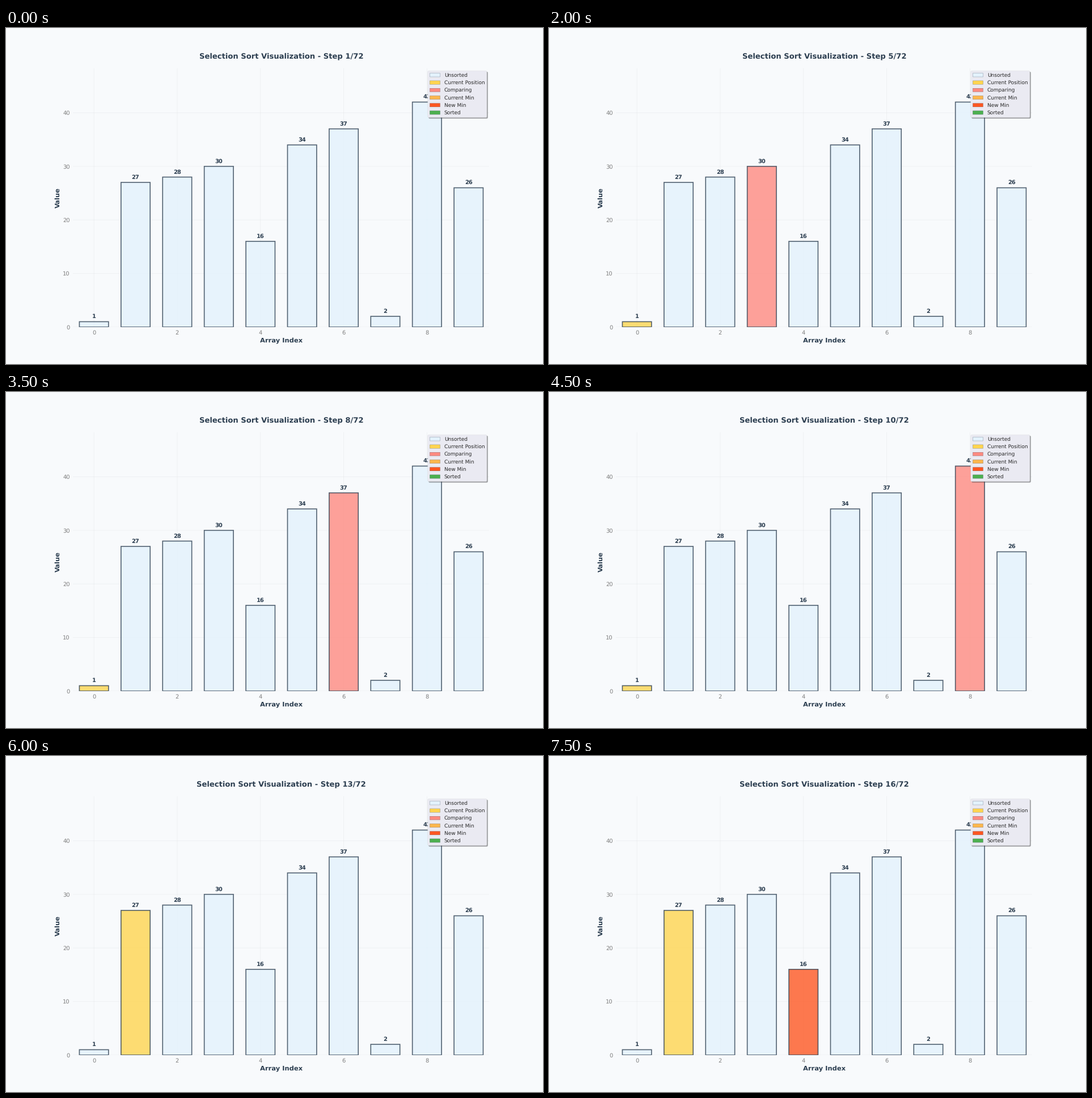
A matplotlib script that plays this animation: 947x592 px, repeating every 8 s.

```python
from itertools import islice

import matplotlib.pyplot as plt
from matplotlib.animation import FuncAnimation
from matplotlib.patches import Patch

VALUES = [1, 27, 28, 30, 16, 34, 37, 2, 42, 26]
TOTAL_STEPS = 72
SHOWN_STEPS = 16
STEP_MS = 500

BACKGROUND = "#F8FAFC"
INK = "#2C3E50"
COLORS = {
    "Unsorted": "#E3F2FD",
    "Current Position": "#FFD54F",
    "Comparing": "#FF8A80",
    "Current Min": "#FFB74D",
    "New Min": "#FF5722",
    "Sorted": "#4CAF50",
}

plt.rcParams.update({
    "font.family": "DejaVu Sans",
    "text.color": "0.15",
    "text.hinting": "none",
    "path.snap": False,
    "patch.linewidth": 0.3,
    "axes.axisbelow": True,
})


def selection_sort(values):
    """Yield the highlighted bars of each step as {index: role}."""
    a = list(values)
    yield {}
    for i in range(len(a) - 1):
        yield {i: "Current Position"}
        low = i
        for j in range(i + 1, len(a)):
            role = "Comparing"
            if a[j] < a[low]:
                low, role = j, "New Min"
            yield {i: "Current Position", j: role}
        a[i], a[low] = a[low], a[i]
        yield {i: "Sorted"}


steps = list(islice(selection_sort(VALUES), SHOWN_STEPS))

fig, ax = plt.subplots(figsize=(16, 10), dpi=59.2, facecolor=BACKGROUND)
ax.set_facecolor(BACKGROUND)
ax.spines[:].set_visible(False)
ax.set_xlim(-0.5, len(VALUES) - 0.5)
ax.set_ylim(0, max(VALUES) * 1.15)
ax.set_xticks(range(0, 10, 2))
ax.set_yticks(range(0, 50, 10))
ax.tick_params(length=0, pad=7, labelsize=12, labelcolor="#808080")
ax.grid(color="#D5D8DC", alpha=0.3, linewidth=1)
ax.set_xlabel("Array Index", fontsize=14, fontweight="bold", color=INK)
ax.set_ylabel("Value", fontsize=14, fontweight="bold", color=INK)
title = ax.set_title("", fontsize=16, fontweight="bold", color=INK, pad=20)

bars = ax.bar(range(len(VALUES)), VALUES, width=0.7, alpha=0.8,
              color=COLORS["Unsorted"], edgecolor=INK, linewidth=2)
for x, value in enumerate(VALUES):
    ax.annotate(str(value), (x, value), xytext=(0, 5),
                textcoords="offset points", ha="center", va="bottom",
                fontsize=12, fontweight="bold", color=INK)

handles = [Patch(facecolor=color, edgecolor=INK, label=role)
           for role, color in COLORS.items()]
ax.legend(handles=handles, loc="upper right", fontsize=11, shadow=True,
          facecolor="#EAEAF2", edgecolor="0.8")


def draw(step):
    roles = steps[step]
    for i, bar in enumerate(bars):
        bar.set_facecolor(COLORS[roles.get(i, "Unsorted")])
    title.set_text(f"Selection Sort Visualization - Step {step + 1}/{TOTAL_STEPS}")
    return [title, *bars]


anim = FuncAnimation(fig, draw, frames=SHOWN_STEPS, interval=STEP_MS,
                     repeat=True, repeat_delay=0, blit=False)
plt.show()
```
